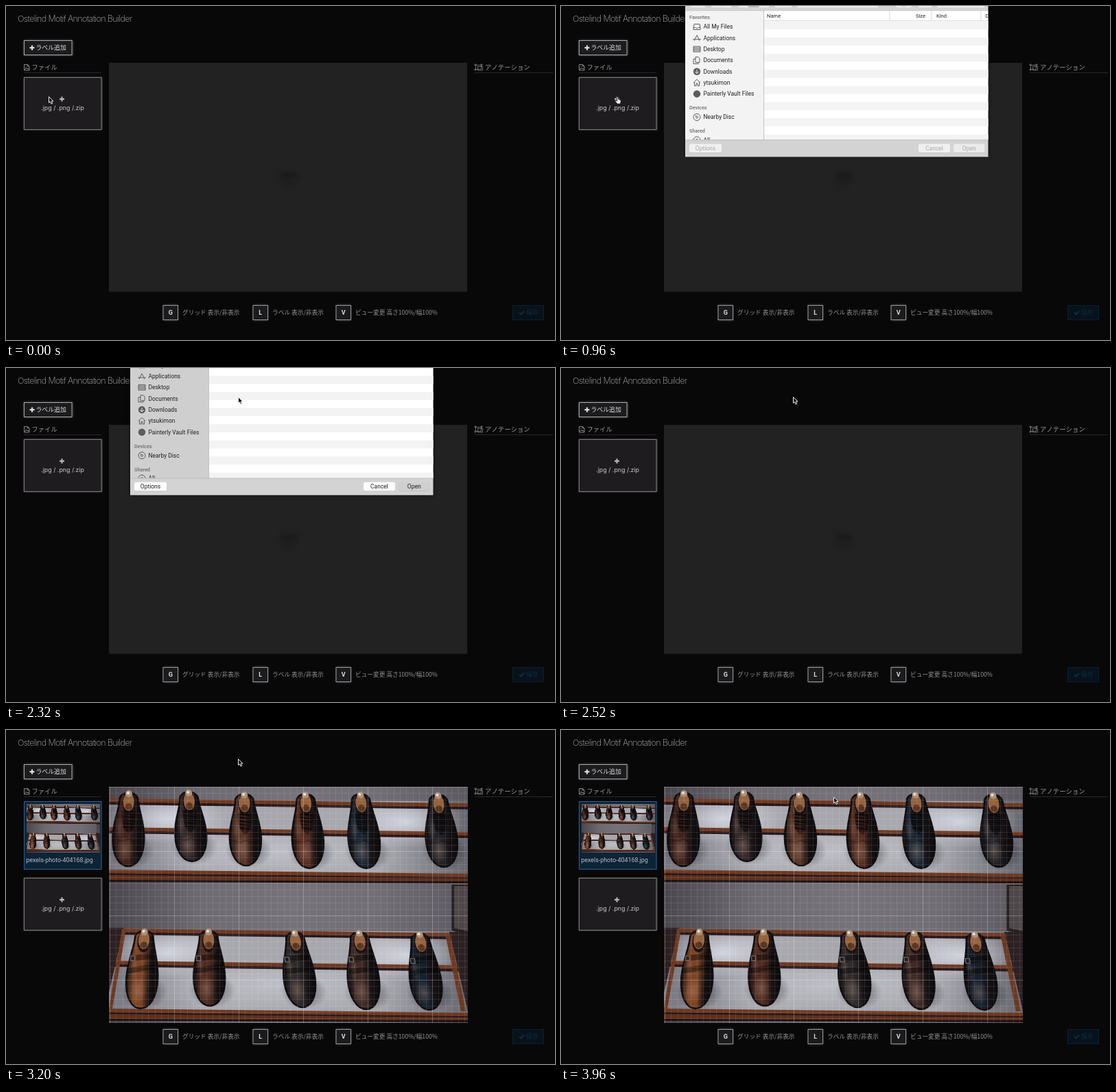
Recreate the animation shown at these times as an HTML page with a canvas. Size 800 by 488 pixels, loop 4000 ms.

```html
<!DOCTYPE html>
<html lang="ja">
<head>
<meta charset="utf-8">
<style>
html, body { margin: 0; width: 100%; height: 100%; overflow: hidden; background: #080809; }
canvas { display: block; }
</style>
</head>
<body>
<canvas id="stage" width="800" height="488"></canvas>
<script>
const LOOP = 4000;
const stage = document.getElementById('stage');
let c = stage.getContext('2d');
const UI = 'Roboto, sans-serif';
const JP = '"Noto Sans CJK JP", "Noto Sans CJK", sans-serif';

function ease(t, from, to) {
  const p = Math.min(1, Math.max(0, (t - from) / (to - from)));
  return (1 - Math.cos(Math.PI * p)) / 2;
}

function text(str, x, y, size, color, { weight = 400, family = UI, align = 'left', spacing = 0 } = {}) {
  c.font = `${weight} ${size}px ${family}`;
  c.letterSpacing = spacing + 'px';
  c.textAlign = align;
  c.fillStyle = color;
  c.fillText(str, x, y);
}

function rect(x, y, w, h, fill) {
  c.fillStyle = fill;
  c.fillRect(x, y, w, h);
}

function round(x, y, w, h, r, fill) {
  c.fillStyle = fill;
  c.beginPath();
  c.roundRect(x, y, w, h, r);
  c.fill();
}

function poly(fill, ...p) {
  c.fillStyle = fill;
  c.beginPath();
  for (let i = 0; i < p.length; i += 2) c.lineTo(p[i], p[i + 1]);
  c.fill();
}

function oval(x, y, rx, ry, fill, angle = 0) {
  c.fillStyle = fill;
  c.beginPath();
  c.ellipse(x, y, rx, ry, angle, 0, 7);
  c.fill();
}

// SVG path drawn at an offset
function icon(x, y, d, { stroke, fill, width = 1 }) {
  c.save();
  c.translate(x, y);
  const path = new Path2D(d);
  if (fill) { c.fillStyle = fill; c.fill(path); }
  if (stroke) { c.strokeStyle = stroke; c.lineWidth = width; c.stroke(path); }
  c.restore();
}

function fade(gradient, ...colors) {
  colors.forEach((color, i) => gradient.addColorStop(i / (colors.length - 1), color));
  return gradient;
}

function glow(x, y, rx, ry, rgb, alpha) {
  c.save();
  c.translate(x, y);
  c.scale(rx, ry);
  oval(0, 0, 1, 1, fade(c.createRadialGradient(0, 0, 0, 0, 0, 1), `rgba(${rgb},${alpha})`, `rgba(${rgb},0)`));
  c.restore();
}

function framed(x, y, w, h, border, fill, blur = 4) {
  c.save();
  c.shadowColor = 'rgba(255,255,255,.35)';
  c.shadowBlur = blur;
  rect(x, y, w, h, fill);
  c.restore();
  c.strokeStyle = border;
  c.lineWidth = 1;
  c.strokeRect(x + .5, y + .5, w - 1, h - 1);
}

function plus(x, y, color) {
  rect(x - 3.5, y - 1.1, 7, 2.2, color);
  rect(x - 1.1, y - 3.5, 2.2, 7, color);
}

// ---- shoe shelf picture, 523 x 345 ----

function shoe(x, top, lean, bottom, color, style) {
  const h = bottom - top;
  c.save();
  c.transform(1, 0, lean / h, 1, x, top);
  glow(4, h * .8, 34, 26, '20,20,28', .6);
  const leather = fade(c.createLinearGradient(-24, 0, 24, 0), '#100c0e', color, color, '#151012', '#0c0a0c');
  icon(0, 0, `M-13 12C-14 32-23 ${h * .42}-23 ${h * .64}C-23 ${h * .86}-13 ${h} 0 ${h}
    C13 ${h} 23 ${h * .86} 23 ${h * .64}C23 ${h * .42} 15 32 13 12C8 2-8 2-13 12Z`, { fill: leather, stroke: '#0d0b0d', width: 2.5 });
  glow(-5, h * .78, 13, 19, '205,170,150', .3);
  glow(-13, h * .5, 6, 18, '205,170,150', .2);
  oval(0, 20, 9.5, 16, '#1c1214');
  oval(0, 18, 8, 13, '#95633f');
  oval(0, 25, 5, 5, '#59341f');
  oval(0, 6, 5, 5, '#a89078');
  oval(-1, 5, 2, 2, '#e8e2d8');
  if (style === 'lace') {
    icon(0, 0, 'M-10 31Q-11 58 0 64Q11 58 10 31Z', { fill: 'rgba(0,0,0,.45)' });
    for (let y = 34; y < 58; y += 5) icon(0, y, 'M-8 0L8 2', { stroke: '#0c0a0c', width: 2 });
    icon(0, 0, 'M-20 72Q-8 78 0 72Q8 78 20 72', { stroke: 'rgba(0,0,0,.35)' });
  } else {
    icon(0, 0, 'M-17 40L15 36L17 44L-19 50ZM-20 58L18 53L20 60L-21 67Z', { fill: 'rgba(0,0,0,.4)' });
    c.strokeStyle = '#8a8078';
    c.lineWidth = 1;
    c.strokeRect(-18, 41, 6, 7);
  }
  c.restore();
}

// a sloping wooden rail with a dark underside
function rail(y, slope, height) {
  poly('#70391f', 0, y, 523, y + slope, 523, y + slope + height, 0, y + height);
  const low = y + height;
  poly('#28171a', 0, low, 523, low + slope, 523, low + slope + 4, 0, low + 4);
}

function shelf(back, middle, front) {
  c.save();
  c.beginPath();
  c.rect(0, back + 4, 523, front - back + 4);
  c.clip();
  rect(0, back, 523, front - back + 8, fade(c.createLinearGradient(0, 0, 523, 0),
    '#77767f', '#a9a9b0', '#a6a6ac', '#a9a9b0', '#66666f'));
  glow(85, middle - 12, 85, 38, '235,238,248', .7);
  glow(432, middle - 8, 85, 38, '235,238,248', .7);
  glow(245, middle + 36, 200, 40, '225,228,236', .4);
  c.restore();
  rail(back, 7, 5);
  rail(middle, 7, 5);
  rail(front, 6, 5);
  poly('#5f301c', 0, front + 8, 523, front + 13, 523, front + 17, 0, front + 15);
  poly('#1d1113', 0, front + 15, 523, front + 17, 523, front + 20, 0, front + 18);
}

function paintPhoto() {
  rect(0, 0, 523, 345, fade(c.createLinearGradient(0, 0, 523, 0), '#4a474e', '#6d6a72', '#75727a', '#716e76', '#5c5960'));
  shelf(17, 59, 121);
  shelf(207, 254, 324);
  poly('#27201f', 499, 143, 523, 143, 523, 216, 499, 210);
  poly('#4e474a', 503, 145, 523, 145, 523, 211, 503, 206);
  poly('#2c2022', 0, 206, 22, 206, 0, 300);
  poly('#6d3820', 19, 208, 25, 208, 5, 324, 0, 324);
  poly('#2c2022', 496, 212, 523, 212, 523, 328);
  poly('#6d3820', 490, 214, 497, 214, 520, 328, 513, 328);
  shoe(29, 4, -1, 116, '#40231c', 'lace');
  shoe(116, 3, 5, 109, '#302527', 'lace');
  shoe(197, 6, 3, 115, '#583427', 'lace');
  shoe(286, 6, 6, 119, '#552d21', 'lace');
  shoe(366, 6, 9, 119, '#1c2632', 'lace');
  shoe(479, 7, 9, 117, '#222226', 'lace');
  shoe(52, 206, -6, 324, '#7c4425', 'strap');
  shoe(145, 206, 2, 320, '#4f2b20', 'strap');
  shoe(270, 208, 12, 322, '#302b2c', 'strap');
  shoe(364, 208, 11, 325, '#412b27', 'strap');
  shoe(452, 210, 15, 326, '#17202c', 'strap');
}

function offscreen(w, h, paint) {
  const layer = document.createElement('canvas');
  const main = c;
  layer.width = w;
  layer.height = h;
  c = layer.getContext('2d');
  paint();
  c = main;
  return layer;
}

const photo = offscreen(523, 345, paintPhoto);

function grid() {
  for (let i = 0; i <= 55; i++) {
    const color = `rgba(255,255,255,${i % 10 ? .09 : .25})`;
    const d = Math.round(i * 9.4);
    rect(151 + d, 83, 1, 345, color);
    if (d < 345) rect(150, 83 + d, 523, 1, color);
  }
}

// ---- page ----

function addTile(y) {
  framed(26, y, 113.5, 77, '#7e7c7f', '#1e1c1f', 2);
  plus(81.5, y + 32, '#b4b4b4');
  text('.jpg / .png /.zip', 82.5, y + 48, 8.9, '#c8c8c8', { family: 'Inter, sans-serif', align: 'center' });
}

function shortcut(x, key, label) {
  framed(x, 437, 22.5, 22, '#979797', '#1b1b1d', 3);
  text(key, x + 11.2, 451.3, 9, '#ddd', { weight: 700, align: 'center' });
  text(label, x + 28.5, 450.6, 8.7, '#929292', { family: JP });
}

function page(loaded) {
  rect(0, 0, 800, 488, '#080809');
  text('Ostelind Motif Annotation Builder', 17, 23, 12.5, '#b4b4b4',
    { weight: 200, family: 'Inter, sans-serif', spacing: -.62 });
  framed(26, 50, 70.5, 22, '#a9a9a9', '#1c1c1f', 3);
  plus(38, 61, '#ddd');
  text('ラベル追加', 43.5, 64.2, 8.9, '#ddd', { weight: 500, family: JP });

  icon(26, 85, 'M.5.5H5.5L8 3V9H.5ZM5.5.5V3H8M1.5 8L3.5 5L5 7L6 6L7.5 8M2.5 3H3.5', { stroke: '#888' });
  text('ファイル', 37.5, 92.6, 9.3, '#999', { family: JP });
  icon(683, 85, 'M1.5 1.5H9.5V7.5H1.5ZM4.5 3.5H11.5V9H4.5ZM0 0H2V2H0ZM9 0H11V2H9ZM0 7H2V9H0Z', { stroke: '#808080', width: .8 });
  text('アノテーション', 698, 92.6, 9.4, '#999', { family: JP });
  rect(26, 97, 113, 1, '#29292b');
  rect(683, 97, 114, 1, '#29292b');

  rect(150, 83, 522, 334.5, '#222223');
  if (loaded) {
    c.drawImage(photo, 150, 83);
    grid();
    framed(26, 104, 113.5, 100, '#2a6294', '#0d2437', 0);
    c.drawImage(photo, 29.5, 108, 107, 70.5);
    text('pexels-photo-404168.jpg', 29.3, 193.3, 8.9, '#b8bec4');
    addTile(216);
  } else {
    c.save();
    c.filter = 'blur(3px)';
    rect(400, 243, 24, 9, '#1a1a1b');
    rect(405, 254, 14, 8, '#1d1d1e');
    c.restore();
    addTile(104);
  }

  shortcut(228.5, 'G', 'グリッド 表示/非表示');
  shortcut(359.5, 'L', 'ラベル 表示/非表示');
  shortcut(480.5, 'V', 'ビュー変更 高さ100%/幅100%');
  framed(738, 437, 46, 22, '#0b2031', '#07121b', 0);
  icon(747, 444, 'M1 4L3.5 6.5L8 1.5', { stroke: '#0f2c42', width: 2 });
  text('保存', 758, 451, 8.8, '#0f2c42', { family: JP });
}

// ---- file dialog ----

const PLACES = [
  ['All My Files', 44, 'M-4-4H4L5 1V4H-5V1ZM-5 1H-2L-1 2H1L2 1H5'],
  ['Applications', 60.3, 'M-4 4L0-4L4 4M-6 2H6'],
  ['Desktop', 76.6, 'M-5-4H5V4H-5ZM-5-2H5M-5 0H5M-5 2H5'],
  ['Documents', 93, 'M-2-5H2L4-3V3H-2ZM-2-2H-5V5H2V3'],
  ['Downloads', 109.3, 'M0-3V3M-3 0L0 3L3 0'],
  ['ytsukimon', 125.7, 'M-5 0L0-5L5 0M-3.5-1V4.5H-1V1H1V4.5H3.5V-1'],
  ['Painterly Vault Files', 142, ''],
  ['Nearby Disc', 176, 'M5 0A5 5 0 1 1-5 0A5 5 0 1 1 5 0M1.5 0A1.5 1.5 0 1 1-1.5 0A1.5 1.5 0 1 1 1.5 0M-3-3L-1-1'],
  ['All...', 209.5, 'M5 0A5 5 0 1 1-5 0A5 5 0 1 1 5 0M1.5 0A1.5 1.5 0 1 1-1.5 0A1.5 1.5 0 1 1 1.5 0'],
];

function toolbar(active) {
  const ink = active ? '#555' : '#aaa';
  const pill = (x, w) => round(x, 2, w, 13.5, 2.5, active ? '#f8f8f8' : '#f1f1f1');
  const mark = (x, d, color = ink) => icon(x, 9, d, { stroke: color });
  pill(188, 23); pill(219, 30); pill(258, 46); pill(311, 26); pill(343, 120);
  pill(488, 23); pill(520, 21); pill(548, 70);
  rect(234, 2, .7, 13.5, '#ccc');
  rect(273, 2, 15.5, 13.5, active ? '#646464' : '#bbb');
  mark(199.5, 'M-5-3.5H5V3.5H-5ZM-2-3.5V3.5M-4-1H-3M-4 1H-3');
  mark(226, 'M2-3.5L-1.5 0L2 3.5', '#aaa');
  mark(242, 'M-2-3.5L1.5 0L-2 3.5', '#aaa');
  for (const x of [262, 266, 316, 320, 324])
    for (const y of x < 300 ? [6, 10] : [5, 8, 11]) rect(x, y, 2, 2, ink);
  mark(280.7, 'M-4-3.5H4M-4-1H4M-4 1.5H4M-4 4H4', '#fff');
  mark(297, 'M-4.5-3H4.5V3H-4.5ZM-1.5-3V3M1.5-3V3');
  mark(331, 'M-2-1L0 1L2-1');
  mark(457, 'M-2-1.5L0-3.5L2-1.5M-2 1.5L0 3.5L2 1.5');
  mark(499.5, 'M-1.5-1H-3.5V4.5H3.5V-1H1.5M0 2V-4.5M-2-2.5L0-4.5L2-2.5', '#aaa');
  mark(530.5, 'M-4 0L-1.5-3H5V3H-1.5Z', '#b5b5b5');
  mark(561, 'M2-1A3 3 0 1 1-4-1A3 3 0 1 1 2-1M1 1L4 4', '#777');
  icon(346, 4.5, 'M0 0H4L5 1H10V9H0Z', { fill: '#56b4ec' });
  text('sample', 358.5, 11.5, 8.6, active ? '#222' : '#999');
  text('Search', 569, 11.5, 8.2, '#999');
}

function dialog(y, { active, listed, selected }) {
  c.save();
  c.translate(0, y);
  c.shadowColor = 'rgba(0,0,0,.6)';
  c.shadowBlur = 5;
  rect(181, -30, 441.5, 264, '#d3d3d3');
  c.shadowBlur = 0;
  c.shadowColor = 'transparent';
  c.beginPath();
  c.rect(181, -30, 441.5, 264);
  c.clip();
  toolbar(active);

  rect(181, 20, 114.5, 189, active ? '#cfcfcf' : '#f3f3f3');
  rect(295.5, 20, 327, 189, '#fff');
  for (let i = 0; i < 15; i += 2) rect(296, 36 + i * 11.8, 327, Math.min(11.8, 173 - i * 11.8), '#f3f3f3');
  rect(295, 20, 1, 189, '#c2c2c2');
  rect(181, 20, 442, .7, '#b8b8b8');
  rect(296, 34.5, 327, .7, '#ccc');
  for (const x of [478.5, 539.5, 611.5]) rect(x, 21, .8, 13, '#ccc');
  text('Name', 300, 30.3, 7.6, '#222');
  text('Size', 531, 30.3, 7.6, '#222', { align: 'right' });
  text('Kind', 547, 30.3, 7.6, '#222');
  text('Date', 618.5, 30.3, 7.6, '#222');

  if (listed) {
    if (selected) rect(296, 36.3, 327, 12, '#1b68d8');
    const dim = selected ? '#fff' : '#858585';
    rect(313, 39.5, 8.5, 6, '#6e6664');
    rect(314, 40.5, 6.5, 1.5, '#9d7358');
    rect(314, 43.2, 6.5, 1.5, '#c2b5aa');
    text('pexels-photo-404168.jpg', 325, 45.6, 8.3, selected ? '#fff' : '#333');
    text('396 KB', 531, 45.6, 8.2, dim, { align: 'right' });
    text('JPEG image', 547, 45.6, 8.2, dim);
    text('Today', 619, 45.6, 8.2, dim);
  }

  c.save();
  c.beginPath();
  c.rect(181, 20, 114, 189);
  c.clip();
  for (const [name, cy] of [['Favorites', 30], ['Devices', 162], ['Shared', 196]])
    text(name, 187, cy + 2.8, 7.3, '#6d6d6d', { weight: 500 });
  for (const [name, cy, d] of PLACES) {
    if (name === 'Downloads' || !d) oval(198, cy, 5.2, 5.2, '#5c5c5c');
    icon(198, cy, d, { stroke: name === 'Downloads' ? '#eee' : '#5c5c5c' });
    text(name, 207.5, cy + 3, 8.45, '#222');
  }
  c.restore();

  rect(181, 209, 442, .8, '#b4b4b4');
  const button = (label, x, w, on, fill) => {
    round(x, 215.5, w, 13, 2.5, '#bcbcbc');
    round(x, 215, w, 12.7, 2.5, fill);
    text(label, x + w / 2, 224.6, 8.5, on ? '#222' : '#a9a9a9', { align: 'center' });
  };
  const face = active ? '#fcfcfc' : '#f0f0f0';
  button('Options', 187, 47, active, face);
  button('Cancel', 521, 46, active, face);
  button('Open', 572, 45.5, selected, selected ? '#cfcfcf' : '#ebebeb');
  c.restore();
}

// ---- pointer: start time, end time, target ----

const MOVES = [
  [230, 440, 80, 133], [1300, 1820, 333, 44],
  [1870, 1960, 338, 42], [3540, 3960, 397, 97.5],
];

function pointer(t) {
  let x = 62, y = 132;
  for (const [from, to, tx, ty] of MOVES) {
    const p = ease(t, from, to);
    x += (tx - x) * p;
    y += (ty - y) * p;
  }
  if (t >= 400 && t < 1120)
    icon(x, y, 'M1.5-.5Q3-1 3.3.5L3.7 3.5L6 4Q7.5 4 7.3 6L6.5 10H2L-1.2 6Q-1.5 4.5 0 5L1.8 6Z', { fill: '#f2f2f2', stroke: '#111', width: .8 });
  else
    icon(x, y, 'M.5.5V9.3L2.5 7.5L4 11L5.7 10.3L4.2 7H7Z', { fill: '#080808', stroke: '#eee', width: 1 });
}

function draw(t) {
  page(t >= 2600);
  const shown = ease(t, 748, 1000) - ease(t, 2246, 2496);
  if (shown > .001)
    dialog((shown - 1) * 234, { active: t >= 1040, listed: t >= 1120, selected: t >= 2000 });
  pointer(t);
}

function tick() {
  draw(performance.now() % LOOP);
  requestAnimationFrame(tick);
}
tick();
</script>
</body>
</html>
```
